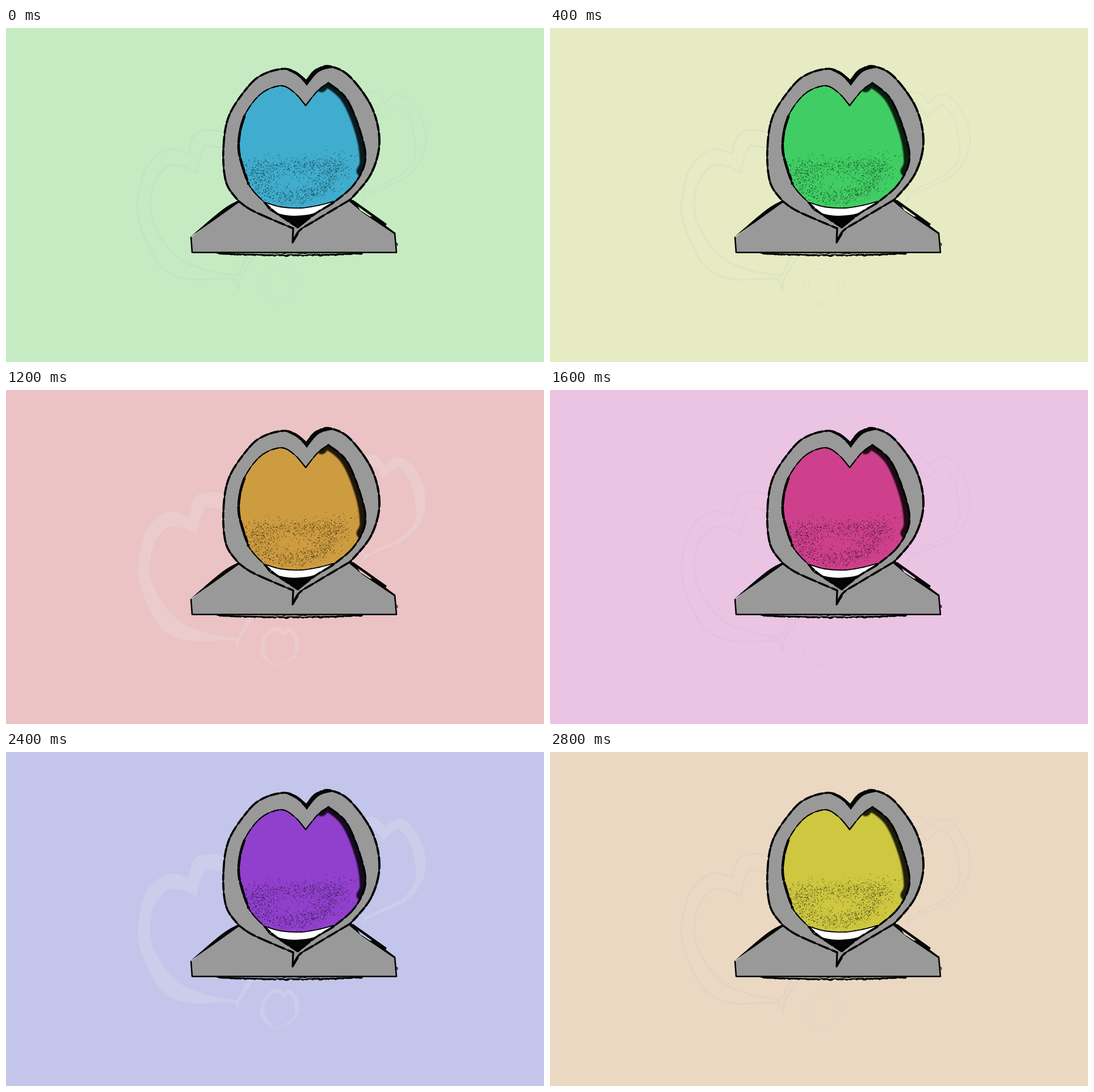
Write an HTML page that moves like this. It is 948 by 590 pixels and loops after 3200 ms.

```html
<!DOCTYPE html>
<html lang="en">
<head>
<meta charset="utf-8">
<title>Hooded heart</title>
<style>
  html, body { margin: 0; width: 100%; height: 100%; overflow: hidden; }
  svg { display: block; width: 100%; height: 100%; background: var(--bg); }
  .halo { fill: var(--band); stroke: var(--line); stroke-width: 3.6; fill-rule: evenodd; }
  .ink { fill: none; stroke: #000; stroke-linecap: round; stroke-linejoin: round; }
  .black { fill: #030504; }
  .grey { fill: #999; }
  .face { fill: var(--face); }
</style>
</head>
<body>
<svg id="stage" viewBox="0 0 948 590" preserveAspectRatio="none">
  <defs>
    <clipPath id="opening"></clipPath>
    <filter id="soft"><feGaussianBlur stdDeviation="1.1"/></filter>
  </defs>
</svg>
<script>
const STEP = 400;
const faceHues = [194, 135, 229, 39, 328, 354, 274, 57];
const skyHues = [116, 67, 193, 359, 311, 311, 237, 32];
const filledHalos = [3, 6];

const stage = document.getElementById('stage');

let seed = 7;
const random = () => (seed = seed * 16807 % 2147483647) / 2147483647;
const between = (low, high) => low + random() * (high - low);

function add(d, attrs, parent = stage) {
  const path = document.createElementNS('http://www.w3.org/2000/svg', 'path');
  path.setAttribute('d', d);
  for (const key in attrs) path.setAttribute(key, attrs[key]);
  parent.appendChild(path);
  return path;
}

// Smooth curve through "x,y x,y ..."; a "|" makes a sharp corner.
function curve(text) {
  let d = '';
  for (const part of text.split('|')) {
    const p = part.trim().split(/\s+/).map(s => s.split(',').map(Number));
    d += (d ? 'L' : 'M') + p[0];
    for (let i = 0; i < p.length - 1; i++) {
      const a = p[i - 1] || p[i], b = p[i], c = p[i + 1], e = p[i + 2] || c;
      const c1 = b.map((v, k) => v + (c[k] - a[k]) / 6);
      const c2 = c.map((v, k) => v - (e[k] - b[k]) / 6);
      d += `C${c1} ${c2} ${c}`;
    }
  }
  return d;
}

const reverse = text => text.trim().split(/\s+/).reverse().join(' ');
const outline = (...sides) => curve(sides.join(' | ')) + 'Z';

// Uneven brush line: a thin stroke with random heavier dabs on top.
function brush(text, width) {
  const d = curve(text);
  const dabs = Array.from({ length: 12 }, (_, i) => i % 2 ? between(4, 9) : between(8, 26));
  add(d, { class: 'ink', 'stroke-width': width * .7 });
  add(d, { class: 'ink', 'stroke-width': width * 1.15, 'stroke-dasharray': dabs.join(' ') });
}

// Hood edges, each running downwards from the notch
const leftOuter = '529,97 510,79 490,72 455,81 428,102 393,155 383,215 388,273 410,306';
const rightOuter = '529,97 550,73 572,68 606,86 645,141 658,202 643,258 607,303';
const leftHem = '410,306 437,324 506,354';
const rightHem = '607,303 545,340 517,358 505,379';
const leftInner = '528,137 508,114 483,102 446,119 416,165 411,220 427,275 456,309';
const rightFold = '528,137 550,110 568,97';
const rightInner = '568,97 600,125 625,185 633,235 612,278 575,310';
const leftRim = '456,309 475,326 514,352';
const rightRim = '575,310 545,328 514,352';

const heart = outline(leftOuter, leftHem, '506,354 505,379', reverse(rightHem), reverse(rightOuter));
const hole = outline(leftInner, leftRim, reverse(rightRim), reverse(rightInner), reverse(rightFold));
const face = outline(leftInner, '456,309 470,314 510,319 575,310', reverse(rightInner), reverse(rightFold));

// Echoes of the hood: notch position, turn and scale
function halo(x, y, turn, scale) {
  add(heart + hole, {
    class: 'halo',
    transform: `translate(${x} ${y}) rotate(${turn}) scale(${scale}) translate(-529 -97)`
  });
}
halo(321, 222, -25.3, .91);
halo(668, 133, 8, .63);
halo(489, 426, 9, .248);

// Ragged shadow below the body
let blobs = '';
for (let x = 373; x < 627; x += 2.5) {
  const r = between(2, 3.6);
  const y = 397 + 4 * Math.sin((x - 373) / 254 * Math.PI) * between(.6, 1);
  blobs += `M${x - r},${y}a${r},${r} 0 1 0 ${2 * r},0a${r},${r} 0 1 0 ${-2 * r},0V396h${2 * r}V${y}z`;
}
add(blobs, { class: 'black' });

// Body
add('M687,379l3,2v3l-3,1z', { class: 'face', stroke: '#000' });
add('M410,305L326,370L328,396.5H688L685,362L607,304Z', { class: 'grey' });
add('M326,370L328,396.5H688L685,362', { class: 'ink', 'stroke-width': 2.6 });
add(curve('410,304 380,322 325,369 | 325,369 383,328 411,308'), { class: 'black' });
add('M602,304H612L671,346L669,349L685,361L684,364L628,326Z', { class: 'black' });
add('M620,315L645,333H641L624,322Z', { fill: 'var(--bg)' });

// Hood and face
add(heart, { class: 'grey' });
add(hole, { class: 'black' });
add(face, { class: 'face' });
add(face, {}, document.getElementById('opening'));
const inside = document.createElementNS('http://www.w3.org/2000/svg', 'g');
inside.setAttribute('clip-path', 'url(#opening)');
stage.appendChild(inside);
add(curve('556,104 568,97 600,125 625,185 633,235 627,253'), {
  class: 'ink', 'stroke-width': 19, 'stroke-opacity': .85, filter: 'url(#soft)'
}, inside);

// Stubble: a ring around the mouth whose sides bend upwards
function stubble(x, y) {
  const dx = (x - 508) / 100;
  const bend = dx * dx * (dx > 0 ? 34 : 16);
  const r = Math.hypot(dx / .68, (y + bend - 271) / 29);
  return .62 * Math.exp(-(((r - 1) / (r < 1 ? .5 : .38)) ** 2));
}
let specks = 'M525,229h1.5v1.5h-1.5z';
for (let i = 0; i < 9000; i++) {
  const x = between(411, 627), y = between(185, 317);
  if (random() > stubble(x, y)) continue;
  const s = between(.5, 1.3).toFixed(1);
  specks += `M${x.toFixed(1)},${y.toFixed(1)}h${s}v${s}h-${s}z`;
}
add(specks, { fill: '#000', 'fill-opacity': .7 }, inside);

// Collar
add(curve('456,308 484,316 520,318 552,313 578,306 | 578,306 548,326 520,332 490,331 466,322 456,308'),
    { fill: '#fff', stroke: '#000', 'stroke-width': 1.8 });

// Ink
brush(leftOuter, 3.2);
brush(rightOuter, 3.4);
brush(leftInner, 2);
brush(rightInner, 3);
brush(rightFold, 2);
brush('420,156 412,185 411,222 427,275', 4);
for (const edge of [leftHem, rightHem, leftRim, rightRim]) brush(edge, 3.2);
add('M506,354L505,379L514,364', { class: 'ink', 'stroke-width': 3.2 });
add(curve('488,71 510,76 529,91 | 529,91 548,71 583,69 | 583,69 552,77 530,102 | 530,102 515,85 488,71'), { class: 'black' });

let shown = -1;
function draw() {
  const index = Math.floor(performance.now() / STEP) % faceHues.length;
  if (index !== shown) {
    shown = index;
    const filled = filledHalos.includes(index);
    const colours = {
      '--bg': `hsl(${skyHues[index]} 49% 84.3%)`,
      '--face': `hsl(${faceHues[index]} 59% 53%)`,
      '--band': filled ? 'rgba(235, 235, 235, .2)' : 'none',
      '--line': `rgba(180, 180, 200, ${filled ? .05 : .13})`
    };
    for (const name in colours) stage.style.setProperty(name, colours[name]);
  }
  requestAnimationFrame(draw);
}
draw();
</script>
</body>
</html>
```
